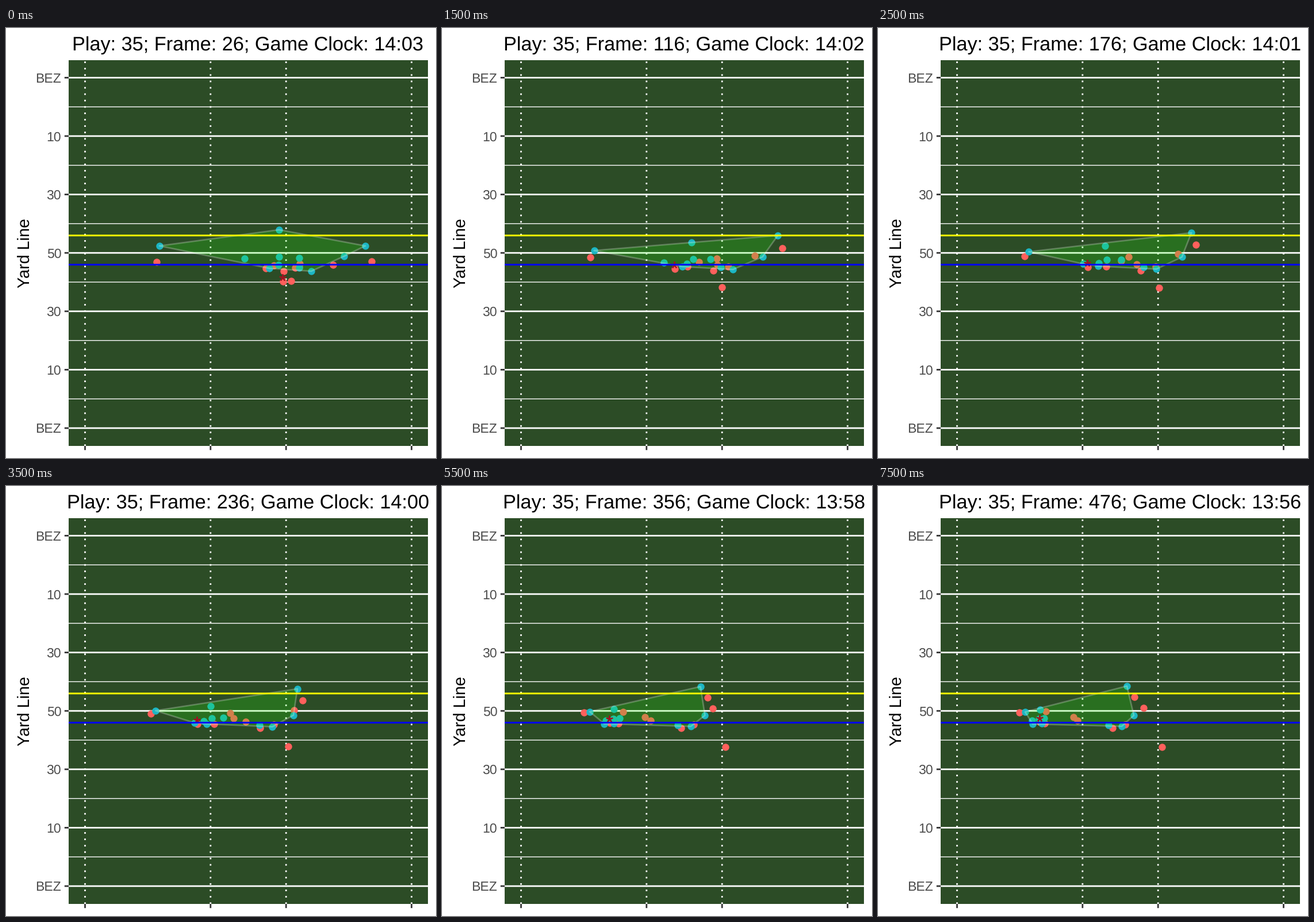
A matplotlib script for the animation above (8 s loop, 748x748 px).

```python
import numpy as np
import matplotlib.pyplot as plt
from matplotlib.animation import FuncAnimation
from matplotlib.patches import Polygon, Rectangle

SIZE, DPI = 748, 64
PX = 72 / DPI  # points per pixel
LEFT, RIGHT, TOP, BOTTOM = 109, 734, 56, 727
STEPS, STEP_MS = 16, 500
GRID = 2.775

plt.rcParams["font.family"] = "Liberation Sans"
plt.rcParams["text.hinting"] = "none"


class Unit:
    """Players sharing a pace; each runs from (x0, y0) to (x1, y1)."""

    def __init__(self, pace, *runs):
        self.pace = pace
        self.start = np.array([run[:2] for run in runs], float)
        self.end = np.array([run[2:] for run in runs], float)

    def at(self, step):
        s = step / (STEPS - 1)
        across = (1 - (1 - s ** 1.6) ** 2.5) ** self.pace
        depth = across ** 0.35  # depth settles well before width
        return self.start + (self.end - self.start) * [across, depth]


RECEIVERS = Unit(0.85, (262, 407, 246, 394), (636, 406, 446, 367), (569, 412, 462, 386))
QUARTERBACK = Unit(0.5, (482, 441, 494, 454))
RUNNER = Unit(0.5, (496, 440, 282, 411))
LINEMEN = Unit(1.1, (452, 418, 290, 413), (466, 413, 340, 402), (511, 410, 292, 392),
               (503, 417, 347, 408), (483, 423, 408, 421), (510, 416, 430, 415))
SECONDARY = Unit(0.9, (267, 379, 256, 393), (475, 351, 282, 389),
                 (625, 379, 433, 348), (588, 397, 445, 399))
LINEBACKERS = Unit(0.95, (415, 401, 269, 414), (475, 398, 280, 405), (510, 400, 289, 404))
RUSHERS = Unit(0.85, (474, 412, 268, 408), (458, 418, 285, 413),
               (510, 417, 401, 416), (531, 423, 424, 418))

OFFENSE = [LINEMEN, RECEIVERS, QUARTERBACK, RUNNER]
DEFENSE = [SECONDARY, LINEBACKERS, RUSHERS]


def positions(units, step):
    return np.vstack([unit.at(step) for unit in units])


def ball_position(step):
    """Just upfield of the carrier, with a handoff in the first second."""
    handoff = min(step / 2, 1)
    x, y = (QUARTERBACK.at(step) * (1 - handoff) + RUNNER.at(step) * handoff)[0]
    return x - 1, y - 7


def convex_hull(points):
    points = sorted(map(tuple, points))

    def chain(ordered):
        side = []
        for x, y in ordered:
            while len(side) > 1:
                (ax_, ay), (bx, by) = side[-2:]
                if (bx - ax_) * (y - ay) > (by - ay) * (x - ax_):
                    break
                side.pop()
            side.append((x, y))
        return side[:-1]

    return chain(points) + chain(points[::-1])


fig = plt.figure(figsize=(SIZE / DPI, SIZE / DPI), dpi=DPI, facecolor="white")
ax = fig.add_axes([0, 0, 1, 1])
ax.set_xlim(0, SIZE)
ax.set_ylim(SIZE, 0)
ax.axis("off")


def line(xs, ys, color, width, z=1, **style):
    ax.plot(xs, ys, color=color, lw=width * PX, zorder=z, snap=False,
            solid_capstyle="butt", **style)


def label(x, y, text, size, **style):
    return ax.text(x, y, text, fontsize=size * PX, va="baseline", **style)


def dots(color, z):
    return ax.plot([], [], "o", color=color, ms=12.4 * PX, mew=0, zorder=z, snap=False)[0]


ax.add_patch(Rectangle((LEFT, TOP), RIGHT - LEFT, BOTTOM - TOP,
                       color="#2c4c26", lw=0, zorder=0))
for i, name in enumerate(["BEZ", "10", "30", "50", "30", "10", "BEZ"]):
    y = 86.4 + 101.6 * i
    line([LEFT, RIGHT], [y, y], "white", GRID)
    line([LEFT - 7.2, LEFT], [y, y], "#333333", GRID)
    label(96.2, y + 8.3, name, 23, color="#4d4d4d", ha="right")
    if i < 6:
        line([LEFT, RIGHT], [y + 50.8] * 2, "white", GRID / 2)
for x in (137.5, 355.8, 487.2, 705.5):
    line([x, x], [BOTTOM, TOP], "white", GRID, linestyle=(0, (1, 3)))
    line([x, x], [BOTTOM, BOTTOM + 7.2], "#333333", GRID)
line([LEFT, RIGHT], [360.9] * 2, "#ffff00", 2.9, z=6)
line([LEFT, RIGHT], [411.7] * 2, "#0000ff", 2.9, z=6)
label(40.8, 391.5, "Yard Line", 28.75, rotation=90, ha="center",
      rotation_mode="anchor")

title = label((LEFT + RIGHT) / 2 - 0.5, 39.3, "", 34.3, ha="center")
offense = dots("#ff605c", 2)
defense = dots("#1cb6c3", 3)
hull_fill = ax.add_patch(Polygon([(0, 0)] * 3, fc=(0.13, 1, 0.03, 0.2), ec="none", zorder=4))
hull_edge = ax.add_patch(Polygon([(0, 0)] * 3, fc="none", ec=(1, 1, 1, 0.25),
                                 lw=2.7 * PX, zorder=4, joinstyle="round"))
ball, = ax.plot([], [], marker=(5, 2, 0), color="#9c1520", ms=12 * PX,
                mew=2.2 * PX, zorder=5, snap=False)


def draw(step):
    seconds = 14 * 60 + 3 - step // 2
    title.set_text(f"Play: 35; Frame: {26 + 30 * step}; "
                   f"Game Clock: {seconds // 60}:{seconds % 60:02d}")
    defenders = positions(DEFENSE, step)
    offense.set_data(*positions(OFFENSE, step).T)
    defense.set_data(*defenders.T)
    x, y = ball_position(step)
    ball.set_data([x], [y])
    corners = convex_hull(defenders)
    hull_fill.set_xy(corners)
    hull_edge.set_xy(corners)
    return title, offense, defense, hull_fill, hull_edge, ball


anim = FuncAnimation(fig, draw, frames=STEPS, interval=STEP_MS,
                     repeat=True, repeat_delay=0, blit=False)
plt.show()
```
